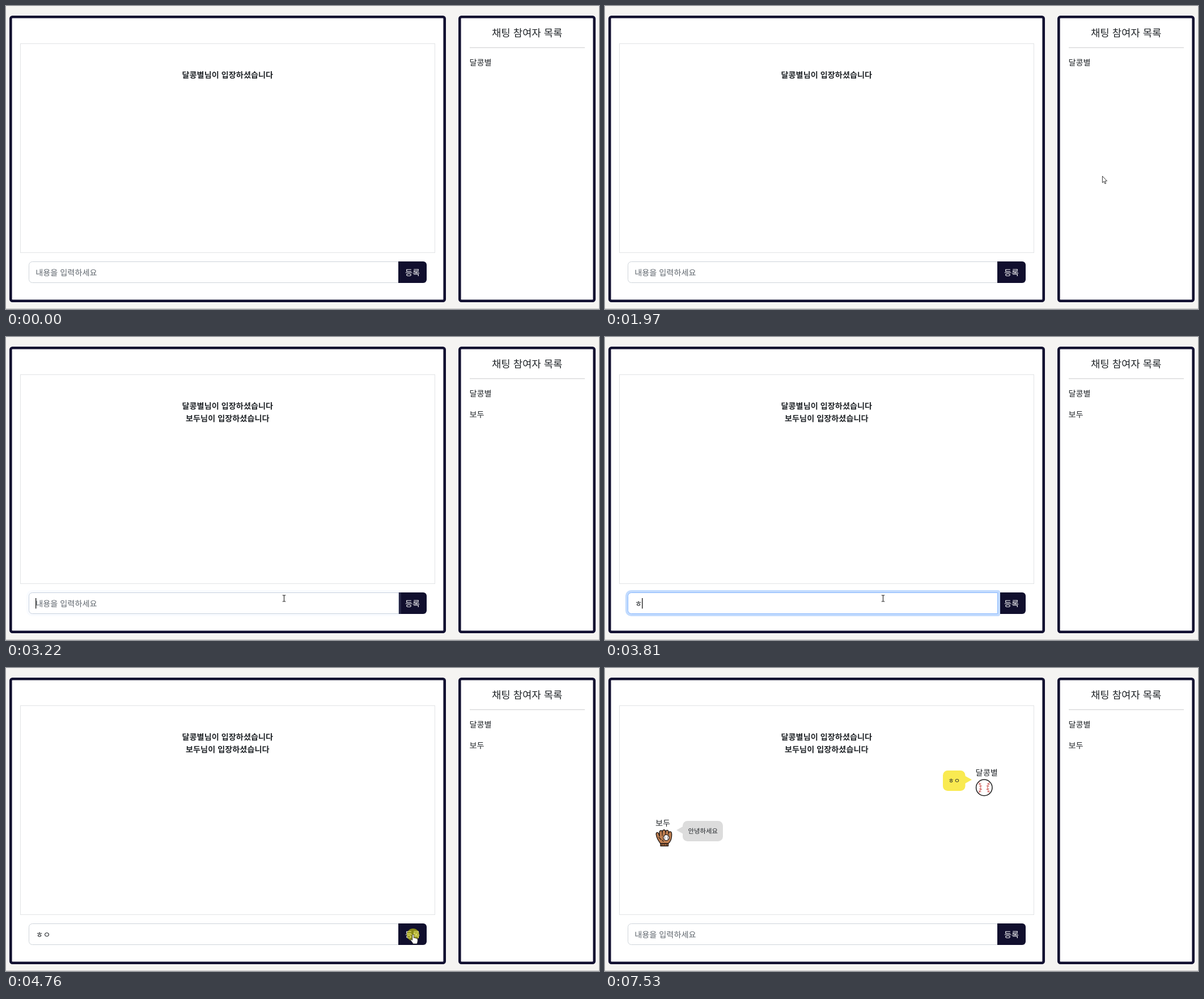
Animation of 1046x535 px, one loop 8 s. Source, as an HTML page:

```html
<!DOCTYPE html>
<html lang="ko">
<head>
<meta charset="utf-8">
<title>Chat room</title>
<style>
html, body { margin: 0; width: 100%; height: 100%; overflow: hidden; background: #f5f4f2; }
svg { display: block; width: 1046px; height: 535px; }
text { font: 14.2px "Noto Sans CJK KR", "Noto Sans CJK JP", "Noto Sans CJK", sans-serif; fill: #212529; text-rendering: geometricPrecision; }
.mid { text-anchor: middle; }
.bold { font-weight: 700; }
.title { font-size: 17.8px; }
.small { font-size: 11.4px; }
.hint { fill: #5f666d; }
.panel { fill: #fff; stroke: #110f30; stroke-width: 4.6; }
</style>
</head>
<body>
<svg id="stage" viewBox="0 0 1046 535">
  <rect width="1046" height="535" fill="#f5f4f2"/>
  <path d="M0 534.5H1046" stroke="#c4c3c2"/>
  <rect class="panel" x="8.3" y="19.3" width="765.4" height="501.4" rx="3"/>
  <rect class="panel" x="800.3" y="19.3" width="237.4" height="501.4" rx="3"/>
  <rect x="25.5" y="66.5" width="731" height="369" fill="#fff" stroke="#e1e3e5"/>

  <text class="mid title" x="919.2" y="54">채팅 참여자 목록</text>
  <path d="M818 73.5H1021" stroke="#d9dadb" stroke-width="1.6"/>
  <text x="817.5" y="105">달콩별</text>
  <text class="mid bold" x="390.8" y="127">달콩별님이 입장하셨습니다</text>
  <g id="joined">
    <text x="817.5" y="142">보두</text>
    <text class="mid bold" x="390.8" y="149">보두님이 입장하셨습니다</text>
  </g>

  <g id="mine">
    <rect x="596" y="181" width="39.5" height="36" rx="8.5" fill="#f9ea51"/>
    <path d="M635 190.5L647 197.3L635 204Z" fill="#f9ea51"/>
    <text class="mid small" x="615.7" y="203.3">ㅎㅇ</text>
    <text x="653.6" y="190">달콩별</text>
    <circle cx="668.8" cy="211.2" r="14.2" fill="#fff" stroke="#1b1b1b" stroke-width="1.5"/>
    <g id="seam" fill="none" stroke="#d0605c" stroke-width="1.1">
      <path d="M659.3 201.5Q666.5 211.2 659.3 221"/>
      <path d="M658.8 205.5l4.6-1.8M660.2 209l4.8-1M660.2 213.4l4.8 1M658.8 217l4.6 1.8"/>
    </g>
    <use href="#seam" transform="translate(1337.6) scale(-1 1)"/>
  </g>

  <g id="reply">
    <rect x="137" y="270" width="71" height="36" rx="8.5" fill="#dcdcdc"/>
    <path d="M138 279.5L126 286.3L138 293Z" fill="#dcdcdc"/>
    <text class="mid small" x="172.7" y="292.3">안녕하세요</text>
    <text x="89" y="278.5">보두</text>
    <g fill="#c08052" stroke="#231a16" stroke-width="1.4" stroke-linejoin="round" stroke-linecap="round">
      <path d="M98 310C94 305 91 300 90.2 293.5C90 290 93 289.5 94.5 292L96.3 297C95.5 291 96 287 98.7 287C100.5 286.8 101 288.5 101 291C101 287 102 285.7 104 285.7C106.3 285.7 106.7 287.5 106.8 290C107 287 108.5 286 110.4 286.6C112.4 287.2 112.4 289 112 291.5C113 288.8 114.6 288.4 116.2 289.3C118.3 290.7 117.8 294 117.4 298C116.8 304 115 307.5 111.5 310Z"/>
      <path d="M98 310H111.5V314.3H98Z" fill="#a86c42"/>
      <path d="M101 291V296M106.8 290V294M112 291.5L111.5 294M95 299L99 303M101 304L103 306" fill="none" stroke-width="1.1"/>
      <path d="M100.5 311.5V313M104.5 311.5V313M108.5 311.5V313" stroke-width=".8"/>
      <circle cx="108" cy="299.5" r="5.2" fill="#fff" stroke-width="1.2"/>
      <path d="M105 296.5Q107.2 299.5 105 302.5M111 296.5Q108.8 299.5 111 302.5" fill="none" stroke="#5a4a48" stroke-width=".8"/>
    </g>
  </g>

  <g id="field">
    <path id="glow" d="M46 447H693a4 4 0 0 1 4 4V489a4 4 0 0 1 -4 4H46a10 10 0 0 1 -10 -10V457a10 10 0 0 1 10 -10Z" fill="#c2dbfe"/>
    <path id="box" d="M692.5 451.5H46.5a6 6 0 0 0 -6 6V482.5a6 6 0 0 0 6 6H692.5Z" fill="#fff"/>
    <text id="hint" class="hint" x="52.2" y="475.5">내용을 입력하세요</text>
    <text id="typed" x="52.5" y="475.5"></text>
    <path id="caret" d="M52.7 461V479.5" stroke="#111" stroke-width="1.3"/>
  </g>
  <g id="button">
    <path d="M692 451H736a6 6 0 0 1 6 6V483a6 6 0 0 1 -6 6H692Z" fill="#110f2e"/>
    <text class="mid" x="717" y="476" style="fill:#fff;font-weight:500">등록</text>
  </g>

  <circle id="click" r="11" fill="#ffff00" fill-opacity=".5"/>
  <g id="pointer">
    <path id="arrow" d="M.4 .4V12L3.1 9.6L4.9 13.9L6.7 13.1L4.9 9H8.5Z" fill="#fff" stroke="#222" stroke-width=".9"/>
    <path id="beam" d="M-2.8 -5.5H-.8L0 -5L.8 -5.5H2.8M0 -5V5M-2.8 5.5H-.8L0 5L.8 5.5H2.8" fill="none" stroke="#222" stroke-width="1.1"/>
    <path id="hand" d="M-1.2 .8a1.2 1.2 0 0 1 2.4 0V5.5Q3 4.6 3.6 6Q5.6 5.4 6 6.8Q8 6.4 8.2 8.5V11Q8 13.5 6.8 16H.2Q-1.5 13 -4 10Q-4.6 8 -2.8 8.2L-1.2 9.6Z" fill="#fff" stroke="#222" stroke-width=".7"/>
  </g>
</svg>
<script>
const LOOP = 8000;
const $ = id => document.getElementById(id);
const show = (id, on) => $(id).setAttribute("display", on ? "inline" : "none");
const clamp = v => Math.max(0, Math.min(1, v));
const smooth = v => v * v * (3 - 2 * v);

// start, end, moves, from x, y, to x, y, ease-out power
const moves = [
  [100, 370, 4, 700, 490, 512, 456, 1],
  [630, 817, 2, 640, 402, 909, 287, 1],
  [1910, 2520, 9, 877, 300, 532, 444, 1.6],
  [2590, 2660, 1, 516, 449, 503.5, 453.5, 1],
  [2720, 3000, 4, 500, 456, 490.5, 461.5, 1],
  [3950, 4250, 4, 520, 464, 748, 484, 1.3],
  [4270, 4410, 2, 738, 479, 718, 471, 1],
  [4840, 5090, 4, 760, 440, 906, 290, 1]
];
const visible = t => t >= 100 && t < 910 || t >= 1910 && t < 5160;

function pointerAt(t) {
  const m = moves.filter(s => s[0] <= t).pop();
  const [t0, t1, n, x0, y0, x1, y1, pow] = m;
  const step = Math.floor(clamp((t - t0) / (t1 - t0)) * n + 1e-6) / n;
  const k = 1 - (1 - step) ** pow;
  return [x0 + (x1 - x0) * k, y0 + (y1 - y0) * k];
}

function drawPointer(t) {
  const on = visible(t);
  show("pointer", on);
  const pressed = t >= 3140 && t < 3220 || t >= 4560 && t < 4770;
  show("click", pressed);
  if (!on) return;
  const [x, y] = pointerAt(t);
  const inRow = y >= 451 && y <= 489;
  const kind = inRow && x > 40 && x < 692 ? "beam" : inRow && x >= 692 && x < 742 ? "hand" : "arrow";
  for (const id of ["arrow", "beam", "hand"]) show(id, id === kind);
  $("pointer").setAttribute("transform", `translate(${x} ${y})`);
  $("click").setAttribute("cx", x);
  $("click").setAttribute("cy", y);
}

function drawField(t) {
  const tick = 3220 + Math.floor((t - 3220) / 70 + 1e-6) * 70;
  const glow = smooth(clamp((tick - 3190) / 150)) * (1 - smooth(clamp((tick - 4610) / 150)));
  const focused = t >= 3220 && t < 4630;
  const mix = (a, b) => Math.round(a + (b - a) * glow);
  $("glow").setAttribute("opacity", glow);
  $("box").setAttribute("stroke", `rgb(${mix(206, 134)},${mix(212, 183)},${mix(218, 254)})`);

  const text = t < 3680 || t >= 4770 ? "" : t < 3890 ? "ㅎ" : "ㅎㅇ";
  $("typed").textContent = text;
  show("hint", !text);
  const lastKey = text.length === 2 ? 3890 : text ? 3680 : 3220;
  show("caret", focused && (t - lastKey) % 1000 < 500);
  $("caret").setAttribute("transform", `translate(${text.length * 13.1})`);

  // the focused field lies above the button
  const [low, high] = focused ? ["button", "field"] : ["field", "button"];
  if ($(low).nextElementSibling !== $(high)) $("stage").insertBefore($(low), $(high));
}

function draw(t) {
  show("joined", t >= 2590);
  show("mine", t >= 4770);
  show("reply", t >= 7530);
  drawField(t);
  drawPointer(t);
}

const start = performance.now();
function frame() {
  draw((performance.now() - start) % LOOP);
  requestAnimationFrame(frame);
}
draw(0);
requestAnimationFrame(frame);
</script>
</body>
</html>
```
